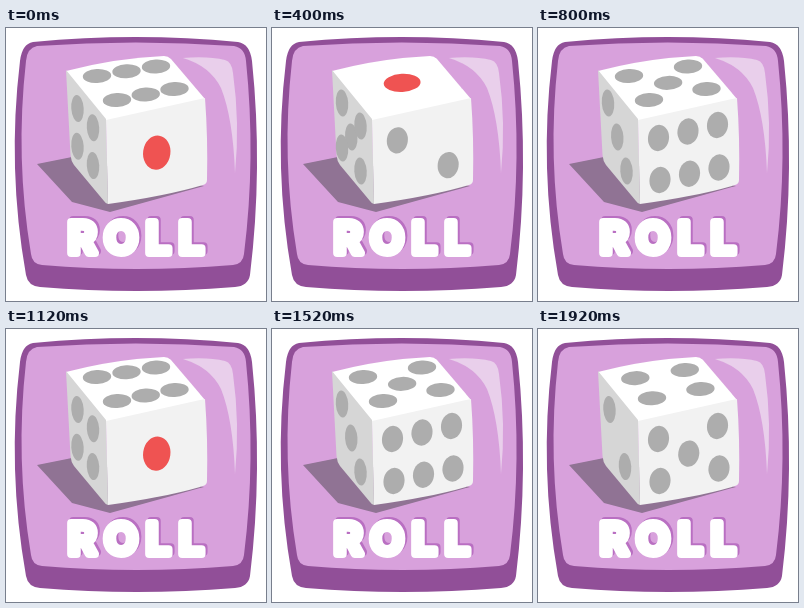
An HTML page for the animation above (2000 ms loop, 260x273 px).

```html
<!DOCTYPE html>
<html lang="en">
<head>
<meta charset="utf-8">
<title>Roll</title>
<style>
  html, body { margin: 0; width: 100%; height: 100%; overflow: hidden; background: #fff; }
  svg { display: block; }
  text { font: 600 43px Inter, "Open Sans", sans-serif; letter-spacing: 8.5px; stroke-width: 8; stroke-linejoin: round; }
</style>
</head>
<body>
<svg width="260" height="273" viewBox="0 0 260 273">
  <path fill="#914f98" d="M27 14Q130 4 232 14Q244 16 246 33Q257 140 244 247Q242 258 229 259Q130 267 34 259Q22 258 20 247Q1 140 14 33Q16 16 27 14Z"/>
  <path fill="#d8a1dc" d="M31 18Q130 11 228 18Q239 20 240 33Q250 130 238 226Q237 236 227 237Q130 245 36 237Q26 236 25 226Q9 130 20 33Q21 20 31 18Z"/>
  <path fill="#e9cfeb" d="M177 30Q202 28 219 32Q226 34 227 45Q234 95 229 145Q227 90 215 60Q204 38 177 30Z"/>
  <path fill="#907394" d="M31 136L66 129L110 140L198 158L104 184L66 174Z"/>
  <path fill="#fff" d="M60 43Q110 30 158 28Q162 28 165 31L199 71L100 93Z"/>
  <path fill="#d6d6d6" d="M60 42L100 91L102 176Q100 176 98 173L68 137Q65 133 64.5 127Z"/>
  <path fill="#f2f2f2" d="M100 92L199 70Q202 110 201 152Q201 156 197 157Q160 168 102 176Z"/>
  <g id="pips"></g>
  <text x="64" y="223" fill="#b96fc2" stroke="#b96fc2">ROLL</text>
  <text x="62" y="225" fill="#fff" stroke="#fff">ROLL</text>
</svg>
<script>
// Each face: corner pips at (u,v) = (0,0), (1,0), (0,1), (1,1), then pip radii and tilt.
const faces = [
  { corners: [[91, 48], [150, 38.5], [111, 72], [168.5, 61]], rx: 14.2, ry: 7, tilt: -3 },
  { corners: [[70, 75], [70, 120], [88.5, 98], [88.5, 143]], rx: 6.2, ry: 13.5, tilt: -4 },
  { corners: [[120.5, 110], [179.5, 97], [122, 152], [181, 139.5]], rx: 10.5, ry: 13.2, tilt: 8 }
];
const throws = "6253412231524164432516354"; // top value at each step
const step = 80;
const pips = document.getElementById("pips");

// Standard die layout as (u,v) points in the unit square.
function layout(n) {
  const inset = n === 2 || n === 4 ? 0.08 : 0, far = 1 - inset;
  const spots = [];
  if (n % 2) spots.push([0.5, 0.5]);
  if (n > 1) spots.push([inset, inset], [far, far]);
  if (n > 3) spots.push([far, inset], [inset, far]);
  if (n === 6) spots.push([0.5, 0], [0.5, 1]);
  return spots;
}

const mix = (a, b, t) => a + (b - a) * t;

function drawFace({ corners: [a, b, c, d], rx, ry, tilt }, n) {
  const size = n === 1 ? 1.3 : 1;
  const fill = n === 1 ? "#ef5352" : "#adadad";
  return layout(n).map(([u, v]) => {
    const [x, y] = [0, 1].map(k => mix(mix(a[k], b[k], u), mix(c[k], d[k], u), v));
    return `<ellipse rx="${rx * size}" ry="${ry * size}" fill="${fill}" transform="translate(${x} ${y}) rotate(${tilt})"/>`;
  }).join("");
}

function showDie(top) {
  const values = [top, (top + 3) % 6 + 1, top % 6 + 1];
  pips.innerHTML = faces.map((face, i) => drawFace(face, values[i])).join("");
}

const start = performance.now();
let shown = 0;
function tick() {
  const elapsed = performance.now() - start;
  const top = +throws[Math.floor(elapsed / step) % throws.length];
  if (top !== shown) showDie(shown = top);
  requestAnimationFrame(tick);
}
tick();
</script>
</body>
</html>
```
